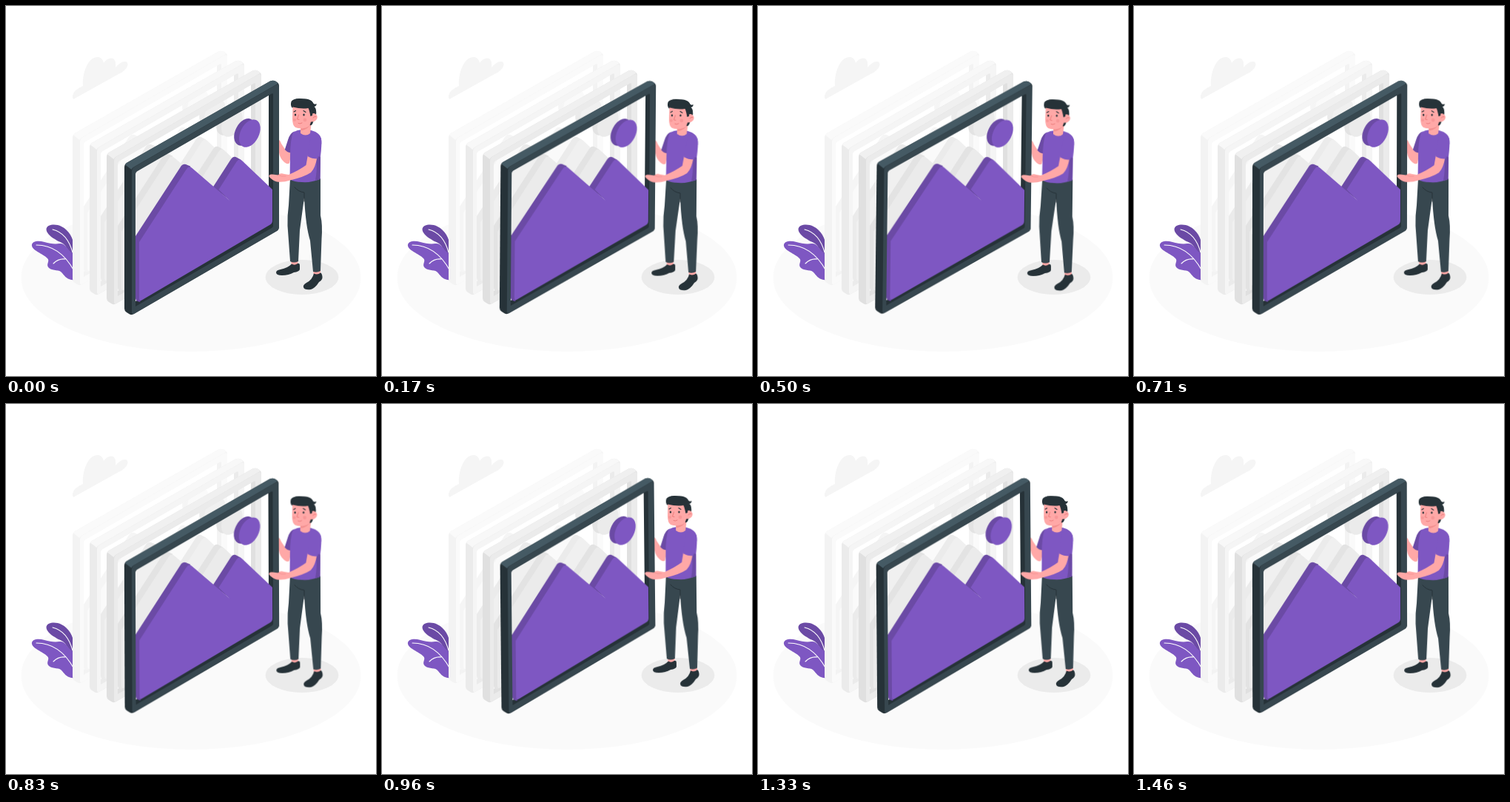
Recreate the animation shown at these times as an HTML page. Size 500x500 px, loop 1.5 s.

```html
<!DOCTYPE html>
<html lang="en">
<head>
<meta charset="utf-8">
<title>Picture frames</title>
<style>
  html, body { margin: 0; width: 100%; height: 100%; overflow: hidden; background: #fff; }
  svg { display: block; width: 100vw; height: 100vh; }
  .side { fill: var(--side); }
  .face { fill: var(--face); }
  .top { fill: var(--top); }
  .shade { fill: var(--shade); }
  .art { fill: var(--art); }
  .far { --side: #f3f3f3; --face: #fafafa; --top: #fafafa; --shade: #f5f5f5; --art: #fafafa; }
  .mid { --side: #ebebeb; --face: #f5f5f5; --top: #f8f8f8; --shade: #ebebeb; --art: #f0f0f0; }
  .near { --side: #e0e0e0; --face: #ebebeb; --top: #f0f0f0; --shade: #e3e3e3; --art: #ebebeb; }
  .front { --side: #263238; --face: #37474f; --top: #455a64; --shade: #6b4aa5; --art: #7e57c2; }
  .skin { fill: #ffa8a7; }
  .ink { fill: #263238; }
  .pants { fill: #37474f; }
  .line { fill: none; stroke-linecap: round; stroke-linejoin: round; }
  #sway { transform-origin: 293.5px 259px; }
</style>
</head>
<body>
<svg viewBox="0 0 500 500">
  <defs>
    <g id="frame">
      <path class="side" fill-rule="evenodd" d="M160 218Q160 214 163 212L357 101.500Q361 100 364 101.500L367 103.500Q369 105 369 108V298Q369 302 366 304L173 416Q170 418 167 416.500L163 414Q160 412 160 409ZM175 226Q175 224 177 223L355 120.500V295L175 399Z"/>
      <path class="top" d="M161 214.500Q161.500 213 163 212L357 101.500Q361 100 364 101.500L368 104.500L172 218Q170 219.500 169.500 221Z"/>
      <path class="face" fill-rule="evenodd" d="M170 223Q170 220 172.500 218L364 107Q369 104 369 109V298Q369 302 366 304L173 416Q170 417.500 170 414ZM175 227Q175 225 177 223.500L359 118.500Q361 117.500 361 119.500V297Q361 299 359 300L175 406Z"/>
      <path class="shade" d="M175 311L235.500 218Q238.500 213 243 214L249 216.500L255 240L181 400Q175 399 175 395Z"/>
      <path class="shade" d="M279.500 245L304 207Q307 202.500 310.500 204L317 207.500L318 262H302Z"/>
      <path class="art" d="M180 319L243.500 221Q247.500 215 252 219.500L302.500 263L287.500 248L311.500 210.500Q315 205.500 319 209L360 248V290Q360 293.500 357 295.500L183.500 397.500Q180 399.500 180 395Z"/>
      <g transform="rotate(27 326 171)">
        <ellipse class="shade" cx="322.500" cy="172" rx="12.500" ry="19.500"/>
        <ellipse class="art" cx="329.500" cy="170.500" rx="12.500" ry="20"/>
      </g>
    </g>
  </defs>

  <ellipse cx="250" cy="367" rx="229.500" ry="100" fill="#fafafa"/>
  <ellipse cx="400" cy="366.500" rx="49.300" ry="23.500" fill="#ebebeb"/>
  <path fill="#f5f5f5" d="M91 126Q88 122 93 115Q97 111 104 108C103 94 108 77 117 71Q129 65 132 77Q138 69 145 71Q149 74 148 83Q157 73 163 75.500Q167 79 161 86Q157 90 152 92Z"/>

  <path fill="#6b4aa5" d="M54.500 301C56 295 67 294 75 298C85 303 91 313 92 326V340L82 327C77 318 72 320 66 315C60 312 54 306 54.500 301Z"/>
  <path fill="#7e57c2" d="M35 322C37 317 45 317 52 319C59 321 66 322 72 321C79 320 82 327 86 331L93 337V370C84 371 80 366 76 361C72 355 64 359 58 354C53 349 60 345 56 341C51 335 33 330 35 322Z"/>
  <g class="line" stroke="#fff" stroke-width="1.100">
    <path d="M63 302Q83 307 90 333"/>
    <path d="M41 323C59 323 78 332 92 358M64 348Q71 341 80 342"/>
  </g>

  <use href="#frame" class="far" x="-70" y="-40"/>
  <use href="#frame" class="mid" x="-47" y="-27"/>
  <use href="#frame" class="near" x="-24" y="-14"/>

  <g id="sway">
    <path class="skin" d="M367 181Q370 180 372 186L378 195L386 197L383 212Q381 215 376 211Q370 206 369 198Z"/>
    <use href="#frame" class="front"/>

    <!-- legs and shoes -->
    <path class="skin" d="M385 343H394.500V351L386 352ZM415 356H425V364L416 365Z"/>
    <path class="ink" d="M386 348.500Q390 351 394 348Q397 347 397 351V356Q396 359 389 360Q382 364 373 364Q365 364 365 360Q365 357 371 356Q381 354 386 348.500Z"/>
    <path class="ink" d="M416 361.500Q421 364 425 360.500Q427 361 427.500 366Q428 370 423 373Q418 381 412 383Q403 384 402 380Q401 377 406 374Q414 370 416 361.500Z"/>
    <path class="pants" d="M384 233H425L425 283Q428 295 426.500 315L425 358Q420 361 415 359L411 317Q405 298 403 259L397 303L395 345Q389 348 384 345L380.500 297Q380 283 382 269Z"/>
    <path class="line" stroke="#263238" stroke-width="1" d="M390 245Q395 251 403 252L403 264"/>

    <!-- shirt -->
    <path fill="#6b4aa5" d="M390 169.500Q384 171 381 181L376.800 194Q380 198 385.500 198.500L391 185Z"/>
    <path fill="#7e57c2" d="M388 170.500Q394 167 400 167L411 167.500Q424 171 426 179Q427 187 425 203L424.500 234Q412 239 400 238Q389 238 383.500 234L384 202Q384 182 388 170.500Z"/>
    <path fill="#6b4aa5" d="M408 203L411 190Q412 201 425 204L424.500 234L418 236Q421 219 419 208Z"/>

    <!-- near arm -->
    <path class="skin" d="M408 201L420.500 204Q418 219 412 225Q403 231 384 235.500Q375 238.500 366 237.500Q360 236 355.500 230.500Q355 227 360 227.500L368 228.500Q370 225 376 227L382 228Q396 222 405.500 215Z"/>
    <path class="line" stroke="#f28f8f" stroke-width=".8" d="M368 228.500Q372 231 378 230"/>
    <path fill="#7e57c2" d="M412 175Q417 170 422 173Q427 178 426.300 186L421 206.500Q413 206.500 407.500 203Z"/>

    <!-- head -->
    <path class="skin" d="M398 160H412.500L411 172Q405 177 398 172Z"/>
    <path fill="#f28f8f" d="M398.500 165Q407 164 411 159Q409 167 398.500 168.500Z"/>
    <path class="ink" d="M386 137Q383 130 388 127Q393 124 402 125.500Q411 125 414.500 130Q416 134 419.500 132Q420 135 416.500 136Q420 138 419 148L415 157Q414 161 411 161.500L404 145Z"/>
    <path class="skin" d="M387.500 136Q396 136 409 135Q412 138 411 148Q414 143.500 418.500 146Q422 149 420 153Q417 157 412 156.500Q411 163 405 164.500Q397 166.500 391 164Q387 161.500 387 152Z"/>
    <path class="ink" d="M385.500 129Q389 124 402 125.500Q413 126 415 132L414 148L411.500 149Q410 141 408.500 138Q399 139.500 387.500 136.500Z"/>
    <g class="ink">
      <ellipse cx="391" cy="147" rx="1.200" ry="1.500"/>
      <ellipse cx="402.500" cy="147" rx="1.200" ry="1.500"/>
    </g>
    <g class="line" stroke="#263238" stroke-width="1.100">
      <path d="M389 143L391.500 141.500M402 141.500L405 143.500"/>
    </g>
    <g class="line" stroke="#e97878" stroke-width=".9">
      <path d="M395.500 147L393.500 153L396 153.500M395 158.500Q397 160 400 158M415 151Q417 148.500 419 149.500"/>
    </g>
    <g fill="#f28f8f" opacity=".6">
      <circle cx="390" cy="154" r="2"/>
      <circle cx="404" cy="154" r="2.400"/>
    </g>
  </g>
</svg>
<script>
  const steps = [[0, 0], [.25, 1], [.75, -1], [1, 0]];
  document.getElementById('sway').animate(
    steps.map(([offset, deg]) => ({ offset, transform: `rotate(${deg}deg)` })),
    { duration: 1500, iterations: Infinity, easing: 'linear' }
  );
</script>
</body>
</html>
```
